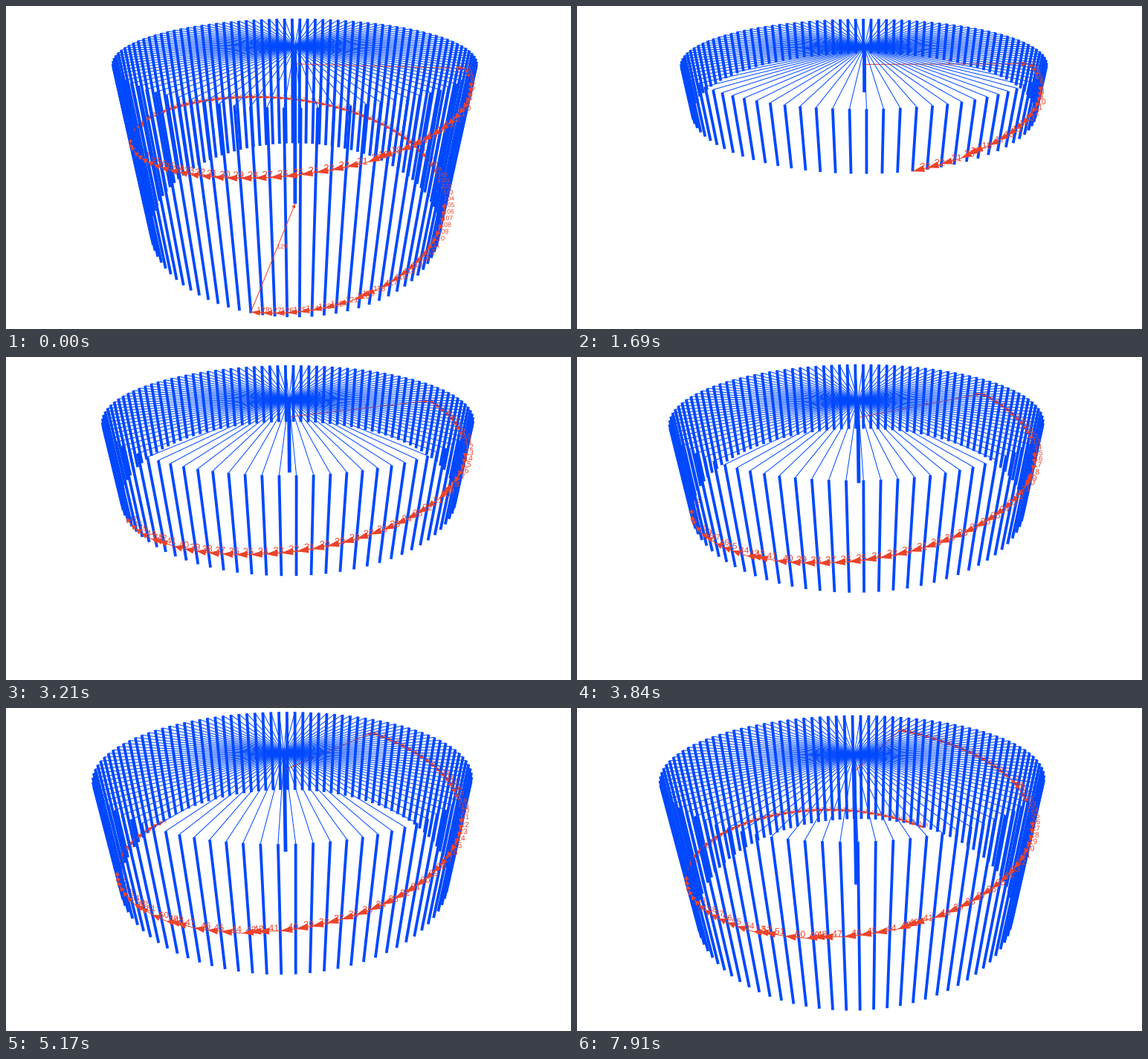
Animation, 760 px wide and 434 px high, one loop 8000 ms. Source, as a matplotlib script:

```python
import numpy as np
import matplotlib.pyplot as plt
from matplotlib.animation import FuncAnimation
from matplotlib.collections import LineCollection, PathCollection, PolyCollection
from matplotlib.textpath import TextPath
from matplotlib.transforms import IdentityTransform

W, H, DPI = 760, 434, 100
STEP_MS, LOOP_MS = 20, 8000
PX = 72 / DPI
BLUE, RED = "#0048ff", "#ec432b"

BARS = 100
PITCH = 2 * np.pi / BARS
RIM_POINTS = 128
LAST_STEP = 105          # steps reached before the loop restarts
CENTER_X = 390
FORESHORTEN = 0.375
DROP_PERSPECTIVE = 0.00085
SILHOUETTE = 0.33        # depth at which the wall turns towards the viewer
HEAD_LEN, HEAD_HALF = 0.05, 0.014
TEXT_PX = 9.0

# camera keys: the drum turns and tips while the path grows
KEY_STEP = (15, 23, 38, 56, 72, 82, 95)
KEY_SPIN = (84.2, 90.8, 99.8, 121.1, 140.6, 149.5, 160.7)
KEY_TILT = (51.5, 52.0, 60.2, 67.0, 76.3, 78.6, 73.0)


def smooth(v):
    v = np.clip(v, 0, 1)
    return v * v * (3 - 2 * v)


def step_times():
    """Moments at which the path gains a step; growth slows down midway."""
    gaps = 61 + 21 * smooth((np.arange(4, LAST_STEP + 1) - 37) / 30)
    gaps[:12] = 75
    return 300 + np.concatenate([[0], np.cumsum(gaps)])


def path_slots():
    """Rim position of each path point, in bar pitches; a few bunch together."""
    slots = np.arange(RIM_POINTS, dtype=float)
    for c in (19, 42, 48, 52, 119):
        slots[c - 2] += 0.5
        slots[c] -= 0.5
    return slots


def depth(i):
    return 23.1 + 1.937 * i


TIMES = step_times()
SLOTS = path_slots()
LABELS = [TextPath((0, 0), str(i), size=1, prop={"family": "Liberation Sans"})
          for i in range(1, RIM_POINTS + 2)]


class Camera:
    def __init__(self, step):
        spin = np.interp(step, KEY_STEP, KEY_SPIN)
        self.tilt = np.interp(step, KEY_STEP, KEY_TILT)
        turn = (spin - KEY_SPIN[0]) / (KEY_SPIN[-1] - KEY_SPIN[0])
        self.spin = np.radians(spin)
        self.scale = 227 + 12.5 * turn
        self.hub = 54.4 + 8.5 * turn
        self.shift = -1.4 - 15.8 * np.sin(np.pi / 2 * turn)
        self.drop = 1 - 0.028 * turn

    def weight(self, p):
        return 1 - FORESHORTEN * p[:, 1] + DROP_PERSPECTIVE * p[:, 2]

    def project(self, p):
        """p holds rows of (sideways, towards viewer, depth below the top)."""
        x, a, d = p.T
        w = self.weight(p)
        sx = CENTER_X + (self.scale * x + self.shift) / w
        top = self.hub * (1 - FORESHORTEN * a) + self.tilt * a
        return np.column_stack([sx, (top + self.drop * d) / w])


def rim(angle, d):
    return np.column_stack([np.sin(angle), np.cos(angle),
                            np.broadcast_to(d, angle.shape)])


def tool_path(cam, step):
    i = np.arange(1, min(step, RIM_POINTS) + 1)
    pts = rim(cam.spin - PITCH * SLOTS[:len(i)], depth(i))
    pts = np.vstack([[0, 0, depth(1)], pts])
    if step > RIM_POINTS:
        pts = np.vstack([pts, [0, 0, depth(step)]])
    return pts


def arrow_heads(cam, start, tip):
    vec = start - tip
    length = np.linalg.norm(vec / [1, 1, 200], axis=1)
    base = tip + vec * (HEAD_LEN / length)[:, None]
    p, b = cam.project(tip), cam.project(base)
    run = p - b
    norm = np.column_stack([-run[:, 1], run[:, 0]])
    norm /= np.hypot(*run.T)[:, None] + 1e-6
    norm *= (HEAD_HALF * cam.scale / cam.weight(base))[:, None]
    return np.stack([p, b + norm, b - norm], axis=1)


fig = plt.figure(figsize=(W / DPI, H / DPI), dpi=DPI, facecolor="white")
ax = fig.add_axes([0, 0, 1, 1])
ax.set_xlim(0, W)
ax.set_ylim(H, 0)
ax.axis("off")


def lines(color, width, z):
    lc = LineCollection([], colors=color, linewidths=width * PX,
                        zorder=z, capstyle="butt")
    return ax.add_collection(lc, autolim=False)


def heads(z):
    pc = PolyCollection([], facecolors=RED, edgecolors="none", zorder=z)
    return ax.add_collection(pc, autolim=False)


def labels(z):
    pc = PathCollection([], offsets=np.empty((0, 2)),
                        offset_transform=ax.transData, facecolors=RED,
                        edgecolors="none", zorder=z)
    pc.set_transform(IdentityTransform())
    return ax.add_collection(pc, autolim=False)


back_bars, front_bars = lines(BLUE, 3.8, 2), lines(BLUE, 3.8, 7)
spokes, axle = lines(BLUE, 1, 5), lines(BLUE, 4.8, 6)
# far side first, near side second
trails = [lines(RED, 1, 3), lines(RED, 1, 8)]
tips = [heads(4), heads(9)]
tags = [labels(1), labels(10)]
ARTISTS = [back_bars, front_bars, spokes, axle, *trails, *tips, *tags]


def draw_drum(cam, step):
    angles = cam.spin - PITCH * np.arange(BARS)
    low = depth(step)
    top = cam.project(rim(angles, 0.0))
    bottom = cam.project(rim(angles, low))
    bars = np.stack([top, bottom], axis=1)
    near = np.cos(angles) > SILHOUETTE
    back_bars.set_segments(bars[~near])
    front_bars.set_segments(bars[near])
    hub, foot = cam.project(np.array([[0, 0, 0], [0, 0, low]], dtype=float))
    spokes.set_segments([(hub, t) for t in top])
    axle.set_segments([(hub, foot)])


def draw_path(cam, step):
    pts = tool_path(cam, step)
    start, tip = pts[:-1], pts[1:]
    mid = (start + tip) / 2
    segs = np.stack([cam.project(start), cam.project(tip)], axis=1)
    cones = arrow_heads(cam, start, tip)
    spots = cam.project(mid)
    sizes = (TEXT_PX * PX / cam.weight(mid)) ** 2
    near = tip[:, 1] > SILHOUETTE
    # text runs to the right, so nearer bars cover it on the left flank
    clear = mid[:, 1] > SILHOUETTE - 0.5 * mid[:, 0]
    if step > RIM_POINTS:
        near[-1] = clear[-1] = True
    for k in (0, 1):
        part, shown = near == k, clear == k
        trails[k].set_segments(segs[part])
        tips[k].set_verts(cones[part])
        tags[k].set_paths([LABELS[i] for i in np.flatnonzero(shown)])
        tags[k].set_offsets(spots[shown])
        tags[k].set_sizes(sizes[shown], DPI)


def update(frame):
    t = frame * STEP_MS + STEP_MS - 1
    done = int(np.searchsorted(TIMES, t, side="right"))
    # the finished drum is held first, then growth starts over
    step = done + 2 if done else RIM_POINTS + 1
    cam = Camera(step if done else 0)
    draw_drum(cam, step)
    draw_path(cam, step)
    return ARTISTS


anim = FuncAnimation(fig, update, frames=LOOP_MS // STEP_MS, interval=STEP_MS,
                     init_func=lambda: update(0), repeat=True, repeat_delay=0)
plt.show()
```
